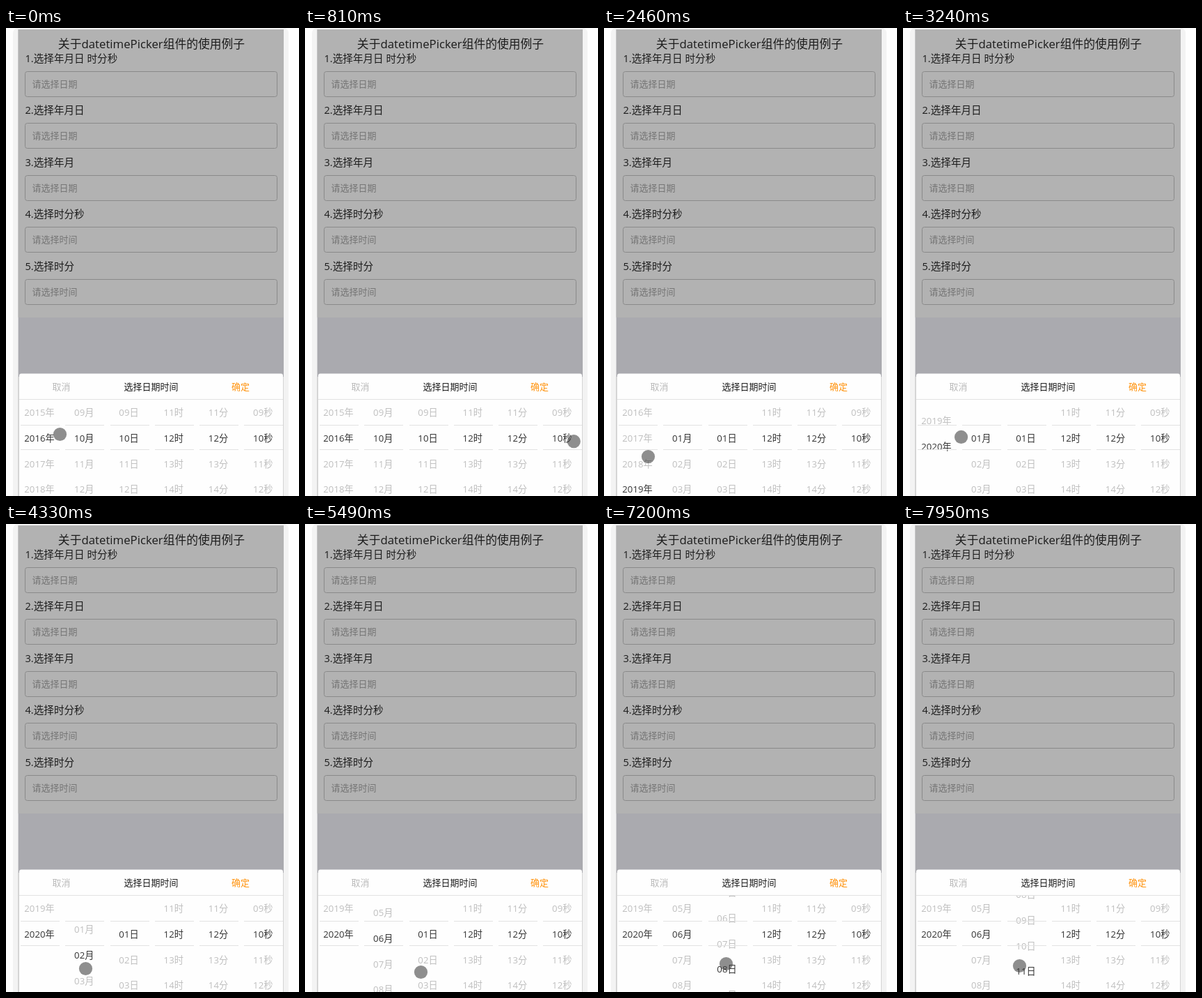
These frames come from a looping animation (421x671 px, 8 s). An HTML page:

```html
<!DOCTYPE html>
<html lang="zh-CN">
<head>
<meta charset="utf-8">
<title>datetimePicker</title>
<style>
  html, body { margin: 0; width: 100%; height: 100%; overflow: hidden; background: #fefefe; }
  svg { display: block; width: 421px; height: 671px; }
  text { font-family: "Open Sans", "Noto Sans CJK SC", "Noto Sans CJK", sans-serif; font-size: 13px; fill: #1c1c1c; }
  .mid { text-anchor: middle; }
  .title { font-size: 16.8px; }
  .label { font-size: 14.6px; }
  .hint { fill: #757575; }
  .field { fill: none; stroke: #8a8a8a; }
  .line { stroke: #e2e2e2; }
  .row { font-size: 13.2px; fill: #bfbfbf; }
  .row.on { fill: #333; }
</style>
</head>
<body>
<svg viewBox="0 0 421 671">
  <clipPath id="wheel"><rect x="19" y="533" width="379" height="138"/></clipPath>
  <rect x="10" y="0" width="396" height="700" rx="7" fill="#f3f3f3"/>
  <rect x="17.6" y="2" width="381.4" height="669" fill="#aaaaaf"/>
  <rect x="17.6" y="2" width="381.4" height="413" fill="#b2b2b2"/>
  <g id="form"><text class="title mid" x="209" y="29">关于datetimePicker组件的使用例子</text></g>
  <rect x="17.6" y="500" width="381.4" height="171" fill="#d4d4d4"/>
  <rect x="19" y="495.5" width="379" height="190" rx="3" fill="#fefefe"/>
  <text class="mid" x="79.5" y="519" style="fill:#b9b9b9">取消</text>
  <text class="mid" x="208.5" y="519">选择日期时间</text>
  <text class="mid" x="337" y="519" style="fill:#ff9410">确定</text>
  <path class="line" d="M19 532.5H398"/>
  <g id="cols" clip-path="url(#wheel)"></g>
  <circle id="dot" r="9.6" fill="#3c3c3c" fill-opacity=".58"/>
</svg>
<script>
const LOOP = 8000, STEP = 137, FIRST = 130;
const ROW = 36.7, MID = 588, FLICK = 480;
const $ = id => document.getElementById(id);
const clamp = u => Math.min(1, Math.max(0, u));
const ease = u => u * u * (3 - 2 * u);
const mix = (a, b, u) => a + (b - a) * u;

function add(parent, tag, attrs, text) {
  const el = document.createElementNS('http://www.w3.org/2000/svg', tag);
  for (const k in attrs) el.setAttribute(k, attrs[k]);
  if (text) el.textContent = text;
  return parent.appendChild(el);
}

['选择年月日 时分秒', '选择年月日', '选择年月', '选择时分秒', '选择时分'].forEach((name, i) => {
  const y = Math.floor(i * 74.5);
  add($('form'), 'text', { class: 'label', x: 27.5, y: 49 + y }, `${i + 1}.${name}`);
  add($('form'), 'rect', { class: 'field', x: 27.5, y: 62.5 + y, width: 362, height: 36, rx: 3 });
  add($('form'), 'text', { class: 'hint', x: 37.5, y: 84.8 + y }, i < 3 ? '请选择日期' : '请选择时间');
});

// Each flick: start time, value it lands on, duration (0 is a jump)
const wheels = [
  { unit: '年', min: 2010, max: 2020, value: 2016, flicks: [[1900, 2017], [2450, 2019], [2980, 2020]] },
  { unit: '月', min: 1, max: 12, value: 10, flicks: [[2450, 1, 0], [4247, 2], [4690, 5], [5116, 6]] },
  { unit: '日', min: 1, max: 31, value: 10, flicks: [[2450, 1, 0], [5700, 2], [6329, 5], [7000, 8], [7694, 11]] },
  { unit: '时', min: 0, max: 23, value: 12, flicks: [] },
  { unit: '分', min: 0, max: 59, value: 12, flicks: [] },
  { unit: '秒', min: 0, max: 59, value: 10, flicks: [] }
];

wheels.forEach((w, i) => {
  const x = 48 + i * 64.25, left = Math.round(x - 27);
  w.list = add($('cols'), 'g', {});
  w.rows = [];
  for (let v = w.min; v <= w.max; v++) {
    const attrs = { class: 'row mid', x, y: MID + 5 + (v - w.min) * ROW };
    w.rows.push(add(w.list, 'text', attrs, String(v).padStart(2, '0') + w.unit));
  }
  add($('cols'), 'path', { class: 'line', d: `M${left} 569.5h56M${left} 604.5h56` });
});

// The list glides to its landing value, which is highlighted at once
function drawWheel(w, t) {
  let pos = w.value, sel = w.value;
  for (const [start, to, time = FLICK] of w.flicks) {
    if (t < start) break;
    pos = mix(pos, to, time ? ease(clamp((t - start) / time)) : 1);
    sel = to;
  }
  w.list.setAttribute('transform', `translate(0 ${(w.min - pos) * ROW})`);
  w.rows.forEach((row, i) => row.classList.toggle('on', i + w.min === sel));
}

// Pointer resting points; from DRAG on it strokes upward between them
const DRAG = 1637, STROKE = 650, LIFT = 62;
const rests = [
  [0, 77.5, 582.5], [140, 47, 582], [720, 402, 590], [1500, 17, 612], [DRAG, 48.5, 615.5],
  [2459, 63.5, 614.5], [4377, 114.5, 637.5], [5473, 166.5, 642.5], [6569, 183.5, 627.5], [7939, 167.5, 633.5]
];

function drawPointer(t) {
  const i = Math.max(1, rests.findIndex(r => r[0] >= t));
  const [ta, xa, ya] = rests[i - 1], [tb, xb, yb] = rests[i];
  const u = (t - ta) / (tb - ta);
  const strokes = ta < DRAG ? 0 : Math.round((tb - ta) / STROKE);
  $('dot').setAttribute('cx', mix(xa, xb, ease(u)));
  $('dot').setAttribute('cy', mix(ya, yb, u) - LIFT * Math.sin(Math.PI * strokes * u) ** 2);
}

let shown = -1;
function frame() {
  const now = performance.now() % LOOP;
  const t = Math.max(0, FIRST + STEP * Math.round((now - FIRST) / STEP));
  if (t !== shown) {
    shown = t;
    wheels.forEach(w => drawWheel(w, t));
    drawPointer(t);
  }
  requestAnimationFrame(frame);
}
frame();
</script>
</body>
</html>
```
